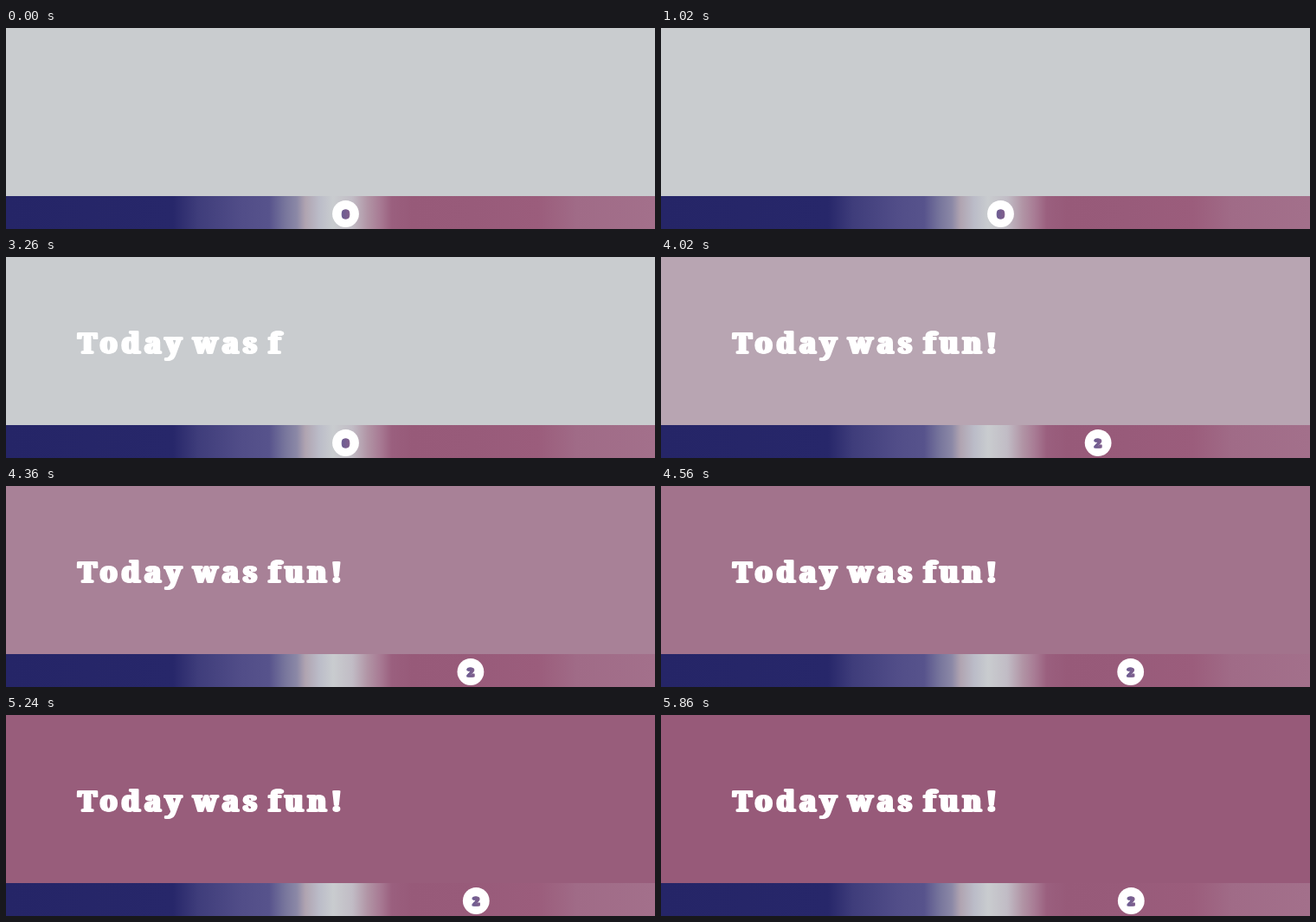
These frames come from a looping animation (750x232 px, 5880 ms). An HTML page:

```html
<!DOCTYPE html>
<html lang="en">
<head>
<meta charset="utf-8">
<title>Mood slider</title>
<style>
  html, body { margin: 0; width: 100%; height: 100%; overflow: hidden; background: #c9cccf; }
  svg { display: block; width: 750px; height: 232px; }
  text {
    font-family: "Noto Serif", "Liberation Serif", serif;
    font-weight: 900;
    stroke-linejoin: round;
    white-space: pre;
    filter: url(#fat);
  }
  #line {
    font-size: 33.2px; letter-spacing: 4.7px; word-spacing: -4.7px;
    fill: #fff; stroke: #fff; stroke-width: 1.6px;
  }
  #score { font-size: 13.5px; text-anchor: middle; fill: url(#ink); stroke: url(#ink); stroke-width: 1px; }
</style>
</head>
<body>
<svg viewBox="0 0 750 232">
  <defs>
    <linearGradient id="scale" gradientUnits="userSpaceOnUse" x1="0" x2="750"></linearGradient>
    <linearGradient id="ink" gradientUnits="userSpaceOnUse" x1="-6" x2="6">
      <stop offset="0" stop-color="#685c94"/>
      <stop offset="1" stop-color="#85608b"/>
    </linearGradient>
    <!-- thickens the upright stems of the slab letters -->
    <filter id="fat" x="-50%" width="200%" color-interpolation-filters="sRGB">
      <feOffset in="SourceGraphic" dx="-1" result="left"/>
      <feOffset in="SourceGraphic" dx="1" result="right"/>
      <feMerge>
        <feMergeNode in="left"/>
        <feMergeNode in="right"/>
        <feMergeNode in="SourceGraphic"/>
      </feMerge>
    </filter>
  </defs>
  <rect id="sky" width="750" height="232"/>
  <text id="line" x="83.2" y="110.7"></text>
  <rect y="194" width="750" height="38" fill="url(#scale)"/>
  <g id="knob">
    <circle r="15.4" fill="#fff"/>
    <text id="score" y="5"></text>
  </g>
</svg>
<script>
const LOOP = 5880;
const MESSAGE = "Today was fun!";
const TYPING = { start: 2100, step: 114 };
const SLIDE = { start: 3500, length: 1160, from: 392.5, to: 543.3 };
const FADE = { start: 3560, length: 2100, from: [201, 204, 207], to: [151, 90, 121] };
const STOPS = [
  [0, "#252567"], [193, "#27276a"], [222, "#3f3d7b"], [272, "#514d88"],
  [304, "#57538c"], [322, "#77759c"], [336, "#8b88a6"], [346, "#b0a4b1"],
  [362, "#bbbcc8"], [378, "#c9cccf"], [400, "#c1bcc5"], [418, "#b194a5"],
  [432, "#a87b94"], [446, "#9a5f7e"], [470, "#975a79"], [540, "#985b7a"],
  [615, "#9b5d7c"], [660, "#a06b87"], [750, "#a3708b"]
];

const $ = id => document.getElementById(id);
const mix = (a, b, k) => a + (b - a) * k;
const progress = (t, part) => Math.min(1, Math.max(0, (t - part.start) / part.length));

// CSS "ease": cubic-bezier(.25, .1, .25, 1)
function ease(x) {
  if (x <= 0 || x >= 1) return x;
  let low = 0, high = 1, s = x;
  for (let i = 0; i < 24; i++) {
    s = (low + high) / 2;
    if (0.75 * s * (1 - s) + s ** 3 < x) low = s; else high = s;
  }
  return 0.3 * s * (1 - s) ** 2 + 3 * s * s * (1 - s) + s ** 3;
}

$("scale").innerHTML = STOPS
  .map(([x, color]) => `<stop offset="${x / 750}" stop-color="${color}"/>`)
  .join("");

function draw(t) {
  const typed = Math.max(0, Math.floor((t - TYPING.start) / TYPING.step) + 1);
  $("line").textContent = MESSAGE.slice(0, typed);

  const fade = ease(progress(t, FADE));
  const color = FADE.from.map((c, i) => Math.round(mix(c, FADE.to[i], fade)));
  $("sky").setAttribute("fill", `rgb(${color})`);

  const x = mix(SLIDE.from, SLIDE.to, ease(progress(t, SLIDE)));
  $("knob").setAttribute("transform", `translate(${x.toFixed(2)} 214.5)`);
  $("score").textContent = t < SLIDE.start ? "0" : "2";
}

const begin = performance.now();
function tick() {
  draw((performance.now() - begin) % LOOP);
  requestAnimationFrame(tick);
}
tick();
</script>
</body>
</html>
```
